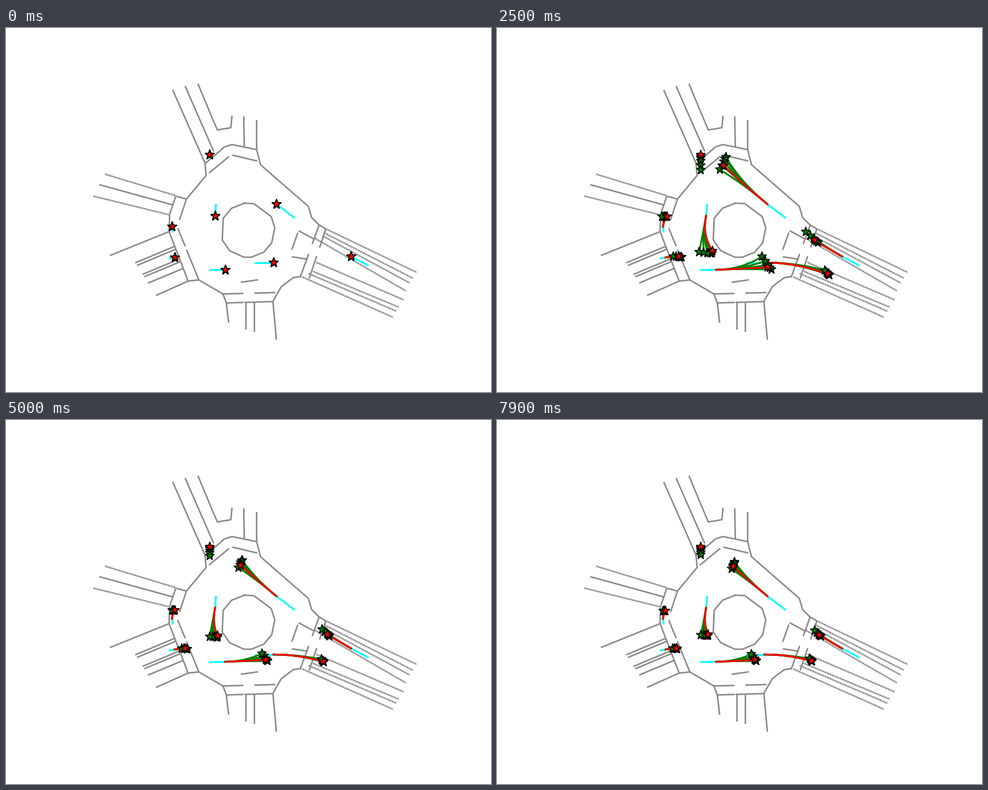
A matplotlib script for the animation above (8 s loop, 864 by 648 pixels).

```python
import numpy as np
import matplotlib.pyplot as plt
from matplotlib.animation import FuncAnimation

W, H = 864, 648
FRAMES, INTERVAL, CYCLE = 80, 100, 30
HORIZON, GUESSES, CURL = 28, 5, 2.3

fig = plt.figure(figsize=(W / 72, H / 72), dpi=72, facecolor="white")
ax = fig.add_axes([0, 0, 1, 1])
ax.set_xlim(-0.5, W - 0.5)
ax.set_ylim(H - 0.5, -0.5)
ax.axis("off")


def stroke(points, color="#8a8a8a", width=2.7, z=1, **kw):
    ax.plot(*np.transpose(points), color=color, lw=width, zorder=z, **kw)


def dotted(points):
    stroke(points, "#b4b4b4")
    stroke(points, "#949494", ls=(0, (1, 0.8)), dash_capstyle="butt")


def lanes(first, last, at, draw=stroke):
    """Lines blended between two outer ones, at the given shares."""
    first, last = np.array(first), np.array(last)
    for u in at:
        draw(first + (last - first) * u)


def crossing(a, b, gap):
    """A straight marking from a to b, open over the given share."""
    a, b = np.array(a), np.array(b)
    g0, g1 = (a + (b - a) * u for u in gap)
    stroke([a, g0])
    stroke([g1, b])


def draw_roads():
    # Kerbs
    stroke([(297, 111), (354, 240), (356, 262), (321, 304), (302, 299),
            (291, 331), (290, 362), (324, 450), (343, 448), (386, 473),
            (392, 489), (396, 523)])
    stroke([(354, 241), (389, 211), (402, 207), (446, 216)])
    stroke([(446, 165), (446, 216), (453, 243), (538, 317), (544, 337),
            (557, 350), (569, 357)])
    stroke([(481, 553), (475, 486), (490, 460), (511, 444), (524, 442)])

    # Central island
    turn = np.radians([-97, -77, -30, -5, 28, 54, 82, 98, 131, 159, 206,
                       234, 263])
    stroke(np.c_[430 + 48.5 * np.cos(turn), 359.5 + 48.5 * np.sin(turn)])

    # North arms
    stroke([(342, 100), (364, 153), (376, 181), (400, 177), (402, 157)])
    stroke([(319, 104), (369, 218)])
    stroke([(423, 158), (424, 211)])
    stroke([(362, 257), (396, 229)])
    stroke([(404, 226), (446, 236)])

    # West arms
    edges = [(177, 260), (302, 298)], [(156, 299), (290, 332)]
    lanes(*edges, (0, 1), dotted)
    lanes(*edges, (0.48,))
    stroke([(321, 304), (309, 340)])
    stroke([(186, 404), (290, 362)])
    lanes([(231, 417), (298, 389)], [(254, 453), (314, 428)],
          (0, 0.13, 0.57, 0.69, 1))
    stroke([(268, 475), (324, 450)])
    crossing((306, 357), (343, 448), (0.33, 0.42))

    # South arm
    lanes([(426, 487), (426, 534)], [(441, 488), (441, 538)], (0, 1))
    crossing((386, 473), (478, 470.5), (0.38, 0.62))
    crossing((392, 489), (475, 486.5), (0.36, 0.41))
    stroke([(419, 452), (447, 448)])

    # East arm
    lanes([(569, 357), (730, 434)], [(564, 370), (718, 453)],
          (0, 0.55, 1), dotted)
    dotted([(550, 374), (711, 467)])
    dotted([(553, 417), (707, 483)])
    lanes([(547, 433), (698, 496)], [(528, 443), (688, 514)],
          (0, 0.4, 1), dotted)
    crossing((524, 442), (557, 351), (0.43, 0.65))
    crossing((540, 444), (569, 358), (0.43, 0.64))
    stroke([(510, 407), (536, 411)])
    stroke([(509, 393), (519, 365)])
    stroke([(522, 361), (548, 375)])


# Start, end at the horizon, first velocity, tail of the history,
# then the nearest and farthest miss of the alternative guesses
agents = [
    ((362, 225), (362, 225), (0, 0), None, (0, 4), (0, 36)),
    ((481, 313), (395, 236), (-3.3, -2.75), (513, 337), (5, -19), (-9, 10)),
    ((372, 334), (389, 404), (-0.45, 2.45), (373.5, 314), (-1, 6), (-31, 3)),
    ((390, 430), (494, 425), (3.42, -0.15), (363, 430.5), (8, 5), (-14, -25)),
    ((476, 417), (604, 444), (4.15, 0.05), (443, 417), (3, 2), (-7, -9)),
    ((614, 406), (563, 376), (-2.55, -1.47), (644, 422), (7, 5), (-21, -20)),
    ((295, 353), (304, 333), (0.15, -0.7), (295, 361), (-2, 0), (-11, 0)),
    ((300, 408), (326, 406.5), (0.98, -0.15), (291, 409.5), (7, 2), (-13, 0)),
]


def path(start, end, vel):
    """Steady run that curls more and more towards its end."""
    t = np.arange(CYCLE)[:, None]
    bend = end - start - vel * HORIZON
    return start + vel * t + bend * (t / HORIZON) ** CURL


def tracer(points, color, z):
    line, = ax.plot([], [], color=color, lw=3.2, zorder=z)
    star, = ax.plot([], [], "*", ms=17.3, mfc=color, mec="black",
                    mew=1.6, zorder=z + 2)
    return points, line, star


def build_tracers():
    tracers = []
    for start, end, vel, tail, near, far in agents:
        if tail:
            stroke([tail, start], "cyan", 3.2, 2)
        start, end, vel, near, far = map(np.array,
                                         (start, end, vel, near, far))
        for u in np.linspace(0, 1, GUESSES) ** 1.5:
            miss = near + (far - near) * u
            tracers.append(tracer(path(start, end + miss, vel), "green", 3))
        tracers.append(tracer(path(start, end, vel), "red", 4))
    return tracers


draw_roads()
tracers = build_tracers()


def update(n):
    step = n % CYCLE
    for points, line, star in tracers:
        line.set_data(*points[:step + 1].T)
        line.set_visible(step > 0)
        star.set_data(*points[step:step + 1].T)
    return [a for _, line, star in tracers for a in (line, star)]


anim = FuncAnimation(fig, update, frames=FRAMES, interval=INTERVAL,
                     repeat=True, repeat_delay=0)
plt.show()
```
